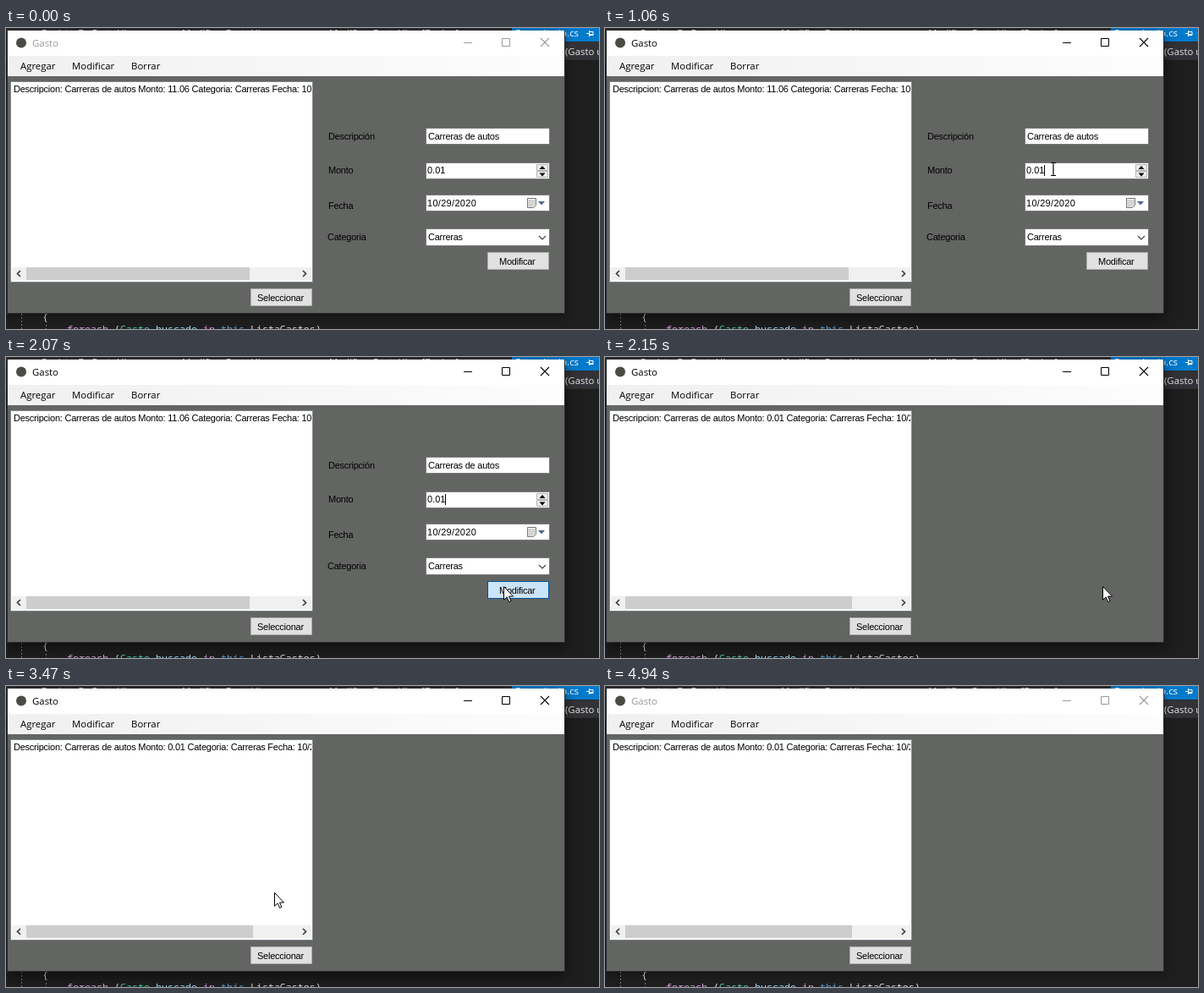
An HTML page that plays this animation: 701x356 px, repeating every 5010 ms.

```html
<!DOCTYPE html>
<html lang="es">
<head>
<meta charset="utf-8">
<title>Gasto</title>
<style>
  html, body { margin: 0; width: 100%; height: 100%; overflow: hidden; background: #1e1e1e; }
  svg { display: block; }
  text { white-space: pre; }
  .ui { font: 11.4px "Open Sans", "Noto Sans", sans-serif; }
  .form { font: 11px "Liberation Sans", Arial, sans-serif; letter-spacing: -.24px; }
  .code { font: 11.67px "Noto Sans Mono", "DejaVu Sans Mono", monospace; fill: #dcdcdc; }
  .field { fill: #fff; stroke: #7a7a7a; }
  .field.hot { stroke: #111; }
  .button { fill: #e1e1e1; stroke: #adadad; }
  .button.hot { fill: #e5f1fb; stroke: #0078d7; }
  .button.down { fill: #cce4f7; stroke: #005499; }
  .line { fill: none; stroke: currentColor; }
  #frame { fill: #2a2a2a; filter: drop-shadow(0 2px 5px rgba(0, 0, 0, .4)); }
  #frame.active { filter: drop-shadow(0 5px 8px rgba(0, 0, 0, .55)); }
  #caption { color: #979c9a; }
  #caption.active { color: #000; }
  #thumb { fill: #cdcdcd; }
  #thumb.hot { fill: #c1c1c1; }
  #next { fill: #f0f0f0; }
  #next.hot { fill: #dadada; }
</style>
</head>
<body>
<svg width="701" height="356" viewBox="0 0 701 356">
  <defs>
    <linearGradient id="menu">
      <stop offset="0" stop-color="#f0f0f0"/>
      <stop offset="1" stop-color="#fdfdfd"/>
    </linearGradient>
  </defs>

  <!-- Editor behind the window -->
  <rect width="701" height="356" fill="#1e1e1e"/>
  <rect width="701" height="38" fill="#2d2d30"/>
  <rect x="598" width="103" height="16" fill="#007acc"/>
  <rect x="600" y="17" width="101" height="20" fill="#333337"/>
  <g class="ui" fill="#e4e4e4">
    <text x="42" y="10">RegistroDeGastoUI.cs</text>
    <text x="208" y="10">ModificarGastoUI.cs</text>
    <text x="382" y="10">ModificarGastoUI.cs [Design]</text>
    <text x="677" y="10" text-anchor="end" fill="#fff">Repositorio.cs</text>
    <text x="661" y="32">(Gasto u</text>
  </g>
  <path d="M686 6.5h3M689.5 3v7M690 4.5h4v4h-4M690 7.5h4" fill="none" stroke="#fff"/>
  <g class="code">
    <text x="43" y="346">{</text>
    <text x="72" y="360"><tspan fill="#d8a0df">foreach</tspan> (<tspan fill="#4ec9b0">Gasto</tspan> <tspan fill="#9cdcfe">buscado</tspan> <tspan fill="#d8a0df">in</tspan> <tspan fill="#569cd6">this</tspan>.ListaGastos)</text>
  </g>
  <path d="M18.5 338v18M47.5 351v5" stroke="#777" stroke-dasharray="2 2"/>

  <!-- Window -->
  <rect id="frame" x="1" y="3" width="660" height="335"/>
  <rect x="2" y="3" width="658" height="334" fill="#636563"/>
  <rect x="2" y="3" width="658" height="30" fill="#fff"/>
  <rect x="2" y="33" width="658" height="24" fill="url(#menu)"/>
  <circle cx="18" cy="17.5" r="6" fill="#4a4a46"/>
  <g id="caption">
    <text class="ui" x="31" y="22" fill="currentColor">Gasto</text>
    <path class="line" d="M541 17.5h10M586.5 12.5h9v9h-9z"/>
    <path class="line" d="M632 12l10 10m0-10l-10 10" stroke-width="1.1"/>
  </g>
  <g class="ui">
    <text x="17" y="49">Agregar</text>
    <text x="78" y="49">Modificar</text>
    <text x="148" y="49">Borrar</text>
  </g>

  <!-- Expense list -->
  <rect x="5.5" y="63.5" width="357" height="237" fill="#fff" stroke="#828790"/>
  <svg class="form" x="7" y="65" width="354" height="16" viewBox="7 65 354 16">
    <text id="item" x="9" y="76"></text>
  </svg>
  <rect x="7" y="283" width="354" height="15" fill="#f0f0f0"/>
  <rect id="thumb" x="24" y="283" height="15"/>
  <rect id="next" x="344" y="283" width="17" height="15"/>
  <path d="M17 287l-3.5 3.5 3.5 3.5M351 287l3.5 3.5-3.5 3.5" fill="none" stroke="#404040" stroke-width="1.7"/>
  <rect class="button" x="289.5" y="308.5" width="72" height="20"/>
  <text class="form" x="297" y="323">Seleccionar</text>

  <!-- Edit form -->
  <g id="form">
    <g class="form">
      <text x="381" y="132">Descripción</text>
      <text x="381" y="172">Monto</text>
      <text x="381" y="214">Fecha</text>
      <text x="380" y="251">Categoria</text>
    </g>
    <rect class="field" x="496.5" y="118.5" width="146" height="19"/>
    <rect class="field" x="496.5" y="159.5" width="146" height="19"/>
    <rect id="date" class="field" x="496.5" y="197.5" width="146" height="19"/>
    <rect id="combo" class="field" x="496.5" y="237.5" width="146" height="20"/>
    <g class="form">
      <text x="499" y="132">Carreras de autos</text>
      <text x="498" y="172" letter-spacing="0">0.01</text>
      <text x="498" y="211" style="letter-spacing:.3px">10/29/2020</text>
      <text x="499" y="251">Carreras</text>
    </g>
    <path d="M627.5 161.5h13v7h-13zM627.5 169.5h13v7h-13z" fill="#ececec" stroke="#b4b4b4"/>
    <path d="M630.5 167h7l-3.5-4zM630.5 171.5h7l-3.5 4z"/>
    <path d="M616.5 201.5h10v8l-3 3h-7z" fill="#e8e8e8" stroke="#777"/>
    <path d="M618 204.5h7M618 206.5h7M618 208.5h7M618 210.5h5" stroke="#999" stroke-dasharray="1 1"/>
    <path d="M629 205h8l-4 4.5z" fill="#51658e"/>
    <path d="M630 246l4 4 4-4" fill="none" stroke="#444" stroke-width="1.2"/>
    <rect id="save" class="button" x="569.5" y="265.5" width="72" height="20"/>
    <text class="form" x="583" y="280">Modificar</text>
    <path id="caret" d="M519.5 162v13" stroke="#000"/>
  </g>

  <path id="arrow" d="M.5.5v15.8l3.6-3.4 2.5 5.6 2.3-1-2.4-5.4h5z" fill="#fff" stroke="#000"/>
  <path id="beam" d="M-3-7.5h2.5l.5.5.5-.5h2.5M0-7v14M-3 7.5h2.5l.5-.5.5.5h2.5" fill="none" stroke="#000" stroke-width="1.2"/>
</svg>

<script>
const LOOP = 5010, TICK = 77, LEAD = 21;
const ACTIVATE = 760, PRESS = 2070, SAVE = 2150, DEACTIVATE = 4940;

// Turning points of the pointer: [tick, x, y]. It is off stage before and after.
const stops = [
  [1, 617, 266], [7, 549, 168], [13, 549, 168], [16, 475, 165], [18, 564, 170],
  [19, 564, 170], [21, 569, 214], [23, 588, 271], [29, 588, 271], [31, 610, 280],
  [36, 350, 301], [37, 344, 300], [40, 174, 99], [44, 344, 275], [48, 174, 75],
  [53, 216, 81], [57, 397, 272], [60, 588, 345]
];

const $ = id => document.getElementById(id);
const show = (id, on) => { $(id).style.display = on ? '' : 'none'; };
const mark = (id, name, on) => $(id).classList.toggle(name, on);
const ease = p => p * p * (3 - 2 * p);

// The screen is sampled in ticks, so the pointer moves in jumps.
function pointerAt(t) {
  const tick = Math.floor((t + LEAD) / TICK);
  const i = stops.findIndex(s => s[0] >= tick);
  if (tick < stops[0][0] || i < 0) return null;
  const [t1, x1, y1] = stops[i];
  const [t0, x0, y0] = stops[Math.max(0, i - 1)];
  const p = t1 > t0 ? ease((tick - t0) / (t1 - t0)) : 1;
  return { x: Math.round(x0 + (x1 - x0) * p), y: Math.round(y0 + (y1 - y0) * p) };
}

function draw(t) {
  const at = pointerAt(t);
  const over = (x, y, w, h) => !!at && at.x >= x && at.x <= x + w && at.y >= y && at.y <= y + h;
  const active = t >= ACTIVATE && t < DEACTIVATE;
  const editing = t < SAVE;

  mark('frame', 'active', active);
  mark('caption', 'active', active);
  show('form', editing);
  show('caret', active);
  $('item').textContent = `Descripcion: Carreras de autos Monto: ${editing ? '11.06' : '0.01'} Categoria: Carreras Fecha: 10/29/2020`;
  $('thumb').setAttribute('width', editing ? 264 : 268);

  mark('date', 'hot', over(496, 197, 147, 20));
  mark('combo', 'hot', over(496, 237, 147, 21));
  mark('save', 'hot', over(569, 265, 73, 21));
  mark('save', 'down', t >= PRESS && editing);
  mark('thumb', 'hot', over(7, 283, 354, 17));
  mark('next', 'hot', over(344, 283, 17, 17));

  const typing = editing && over(496, 159, 130, 20);
  show('arrow', at && !typing);
  show('beam', at && typing);
  if (at) $(typing ? 'beam' : 'arrow').setAttribute('transform', `translate(${at.x} ${at.y})`);
}

function run() {
  draw(performance.now() % LOOP);
  requestAnimationFrame(run);
}
run();
</script>
</body>
</html>
```
